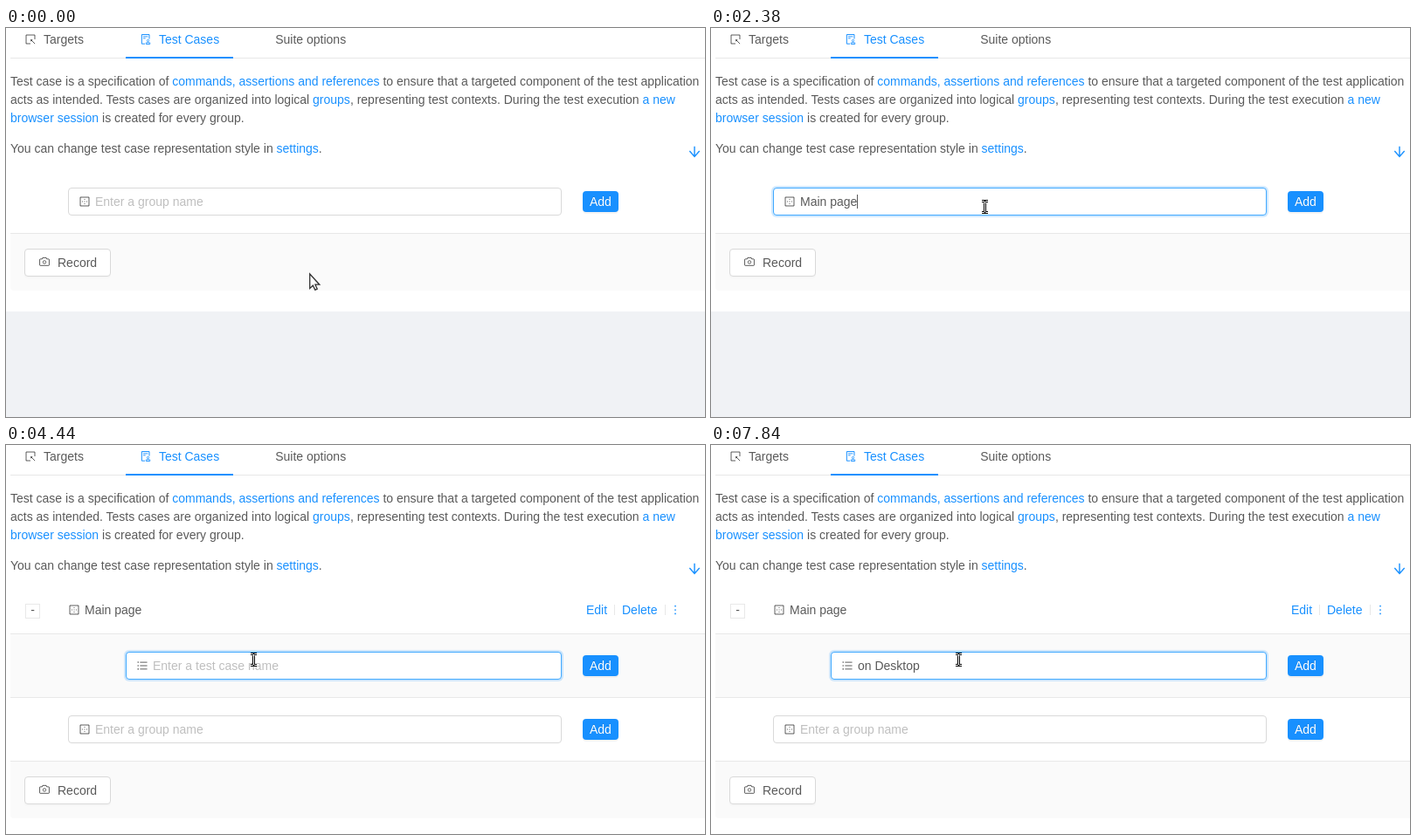
Write an HTML page that moves like this. It is 800 px wide and 446 px high and loops after 8000 ms.

```html
<!DOCTYPE html>
<html lang="en">
<head>
<meta charset="utf-8">
<title>Test cases</title>
<style>
html, body { margin: 0; width: 100%; height: 100%; overflow: hidden; background: #fff; }
body { position: relative; font: 14px/16px "Liberation Sans", Arial, sans-serif; color: rgba(0,0,0,.65); }
body *:not(a) { box-sizing: border-box; }
div, span, svg.i, svg.cursor { position: absolute; white-space: nowrap; }
a { color: #1890ff; }
.i { width: 14px; height: 14px; fill: none; stroke: currentColor; stroke-width: 72; }
.blue { color: #1890ff; }
.line { left: 5px; right: 0; height: 1px; background: #e8e8e8; }
.panel { left: 5px; right: 0; background: #fafafa; }
.input { height: 32px; border: 1px solid #d9d9d9; border-radius: 4px; background: #fff; }
.input.hover { border-color: #8cc1ec; }
.input.active, .input.focus { border-color: #40a9ff; }
.input.focus { box-shadow: 0 0 0 2px rgba(24,144,255,.2); }
.hint { color: #bfbfbf; }
.caret { width: 1px; height: 16px; background: #595959; }
.add { left: 660px; width: 41px; height: 24px; padding: 4px 0 0 8px; border-radius: 4px; color: #fff;
  background: #1890ff; text-shadow: 0 -1px 0 rgba(0,0,0,.12); box-shadow: 0 2px 0 rgba(0,0,0,.045); }
.record { left: 21px; top: 253px; width: 99px; height: 32px; border: 1px solid #d9d9d9; border-radius: 4px;
  background: #fff; box-shadow: 0 2px 0 rgba(0,0,0,.015); }
.toggle { left: 22px; top: 182px; width: 17px; height: 17px; border: 1px solid #e8e8e8; background: #fff; }
.sep { top: 183px; width: 1px; height: 12px; background: #e8e8e8; }
.cursor { width: 24px; height: 24px; overflow: visible; }
#lower { left: 0; width: 100%; height: 446px; }
#group { left: 0; top: 0; width: 100%; height: 446px; }
</style>
</head>
<body>
<svg width="0" height="0" style="position:absolute">
  <symbol id="select" viewBox="0 0 1024 1024">
    <path d="M512 876H148V148H876V512M590 590L882 882"/>
    <path d="M512 512L710 534 534 710z" fill="currentColor" stroke="none"/>
  </symbol>
  <symbol id="audit" viewBox="0 0 1024 1024">
    <path d="M440 888H172V112H804V476"/>
    <path d="M288 282H688M288 426H488M696 720V780M535 795H857V917H535z" stroke-width="63"/>
    <circle cx="696" cy="620" r="81" stroke-width="62"/>
  </symbol>
  <symbol id="grid" viewBox="0 0 1024 1024">
    <path d="M148 148H876V876H148z"/>
    <path d="M476 330h72M294 512h72M476 512h72M658 512h72M476 694h72"/>
  </symbol>
  <symbol id="list" viewBox="0 0 1024 1024">
    <path d="M320 228H920M320 512H920M320 796H920"/>
    <path d="M160 228h0M160 512h0M160 796h0" stroke-width="112" stroke-linecap="round"/>
  </symbol>
  <symbol id="camera" viewBox="0 0 1024 1024">
    <path d="M160 284H321L361 172H663L703 284H864a44 44 0 0 1 44 44V784a44 44 0 0 1-44 44H160a44 44 0 0 1-44-44V328a44 44 0 0 1 44-44z"/>
    <circle cx="512" cy="544" r="128" stroke-width="64"/>
  </symbol>
  <symbol id="down" viewBox="0 0 1024 1024">
    <path d="M512 152V820M190 452L512 826 834 452" stroke-width="80"/>
  </symbol>
  <symbol id="more" viewBox="0 0 1024 1024">
    <path d="M512 232h0M512 512h0M512 792h0" stroke-width="112" stroke-linecap="round"/>
  </symbol>
</svg>

<svg class="i" style="left:21px;top:6px"><use href="#select"/></svg>
<span style="left:43px;top:5px">Targets</span>
<svg class="i blue" style="left:153px;top:6px"><use href="#audit"/></svg>
<span class="blue" style="left:174.9px;top:5px">Test Cases</span>
<span style="left:308.2px;top:5px">Suite options</span>
<div class="line" style="top:34px"></div>
<div style="left:137px;top:33px;width:123px;height:2px;background:#1890ff"></div>

<span style="left:5px;top:53px">Test case is a specification of <a>commands, assertions and references</a> to ensure that a targeted component of the test application</span>
<span style="left:5px;top:74px">acts as intended. Tests cases are organized into logical <a>groups</a>, representing test contexts. During the test execution <a>a new</a></span>
<span style="left:5px;top:95px"><a>browser session</a> is created for every group.</span>
<span style="left:5px;top:130px">You can change test case representation style in <a>settings</a>.</span>
<svg class="i blue" style="left:779px;top:133px;width:18px;height:18px"><use href="#down"/></svg>

<div id="group">
  <div class="toggle"></div>
  <span style="left:28.2px;top:181px">-</span>
  <svg class="i" style="left:71px;top:182px"><use href="#grid"/></svg>
  <span style="left:90px;top:181px">Main page</span>
  <span class="blue" style="left:664px;top:181px">Edit</span>
  <div class="sep" style="left:696px"></div>
  <span class="blue" style="left:705px;top:181px">Delete</span>
  <div class="sep" style="left:754px"></div>
  <svg class="i blue" style="left:758px;top:181px;width:16px;height:16px"><use href="#more"/></svg>
  <div class="line" style="top:216px"></div>
  <div class="panel" style="top:217px;height:72px"></div>
  <div class="line" style="top:289px"></div>
  <div class="input" id="caseBox" style="left:137px;top:237px;width:499px"></div>
  <svg class="i" style="left:149px;top:246px"><use href="#list"/></svg>
  <span id="caseText" style="left:168px;top:245px"></span>
  <div class="add" style="top:241px">Add</div>
</div>

<div id="lower">
  <div class="input" id="groupBox" style="left:71px;top:183px;width:565px"></div>
  <svg class="i" style="left:83px;top:192px"><use href="#grid"/></svg>
  <span id="groupText" style="left:102px;top:191px"></span>
  <div class="add" style="top:187px">Add</div>
  <div class="line" style="top:235px"></div>
  <div class="panel" style="top:236px;height:65px;border-bottom-left-radius:4px"></div>
  <div class="record"></div>
  <svg class="i" style="left:37px;top:261px"><use href="#camera"/></svg>
  <span style="left:59px;top:261px">Record</span>
  <div style="left:0;right:0;top:325px;height:121px;background:#f0f2f5"></div>
</div>

<div class="caret" id="caret"></div>

<svg class="cursor" id="arrow" style="left:347px;top:281px">
  <path d="M.7 1V17.6L4.3 14.2 6.8 19.3 9.2 18.1 6.9 13.2H11.8z" fill="#fff" stroke="#333" stroke-width="1.3"/>
</svg>
<svg class="cursor" id="beam" fill="none">
  <path id="stem" d="M1 1.5H3.5L4.5 2.5 5.5 1.5H8M4.5 2V14M1 14.5H3.5L4.5 13.5 5.5 14.5H8" stroke="#000" stroke-width="3"/>
  <path d="M1 1.5H3.5L4.5 2.5 5.5 1.5H8M4.5 2V14M1 14.5H3.5L4.5 13.5 5.5 14.5H8" stroke="#fff"/>
</svg>
<svg class="cursor" id="hand" style="left:303px;top:199px">
  <path d="M3 13H15a1.7 1.7 0 0 0 1.4-1.7V6a1.6 1.6 0 0 0-3-1.2V3.2a1.7 1.7 0 0 0-3-.8 1.6 1.6 0 0 0-3.2-.2 1.7 1.7 0 0 0-2.6 1.5V5C2 3.4.3 5 .8 7.5V10z" fill="#fff" stroke="#1f8428" stroke-width="1.4"/>
  <path d="M2.5 13.4H15" stroke="#35543a"/>
  <path d="M5 8.5h1.4M8 8.5h1.4M11 8.5h1.4" stroke="#667"/>
</svg>

<script>
const LOOP = 8000, SWITCH = 3080;
const $ = id => document.getElementById(id);

// [start ms, typed text, caret visible]
const groupSteps = [
  [0, "", false], [330, "", true], [660, "", false], [1010, "Ma", true], [1380, "Main ", true],
  [1700, "Main p", true], [2050, "Main pag", true], [2380, "Main page", true], [SWITCH, "", false]
];
const caseSteps = [
  [0, "", false], [4770, "on ", true], [5450, "on ", false], [5800, "on D", true], [6130, "on Des", true],
  [6480, "on Desk", true], [6810, "on Deskt", true], [7160, "on Desktop", true], [7840, "on Desktop", false]
];

const stepAt = (steps, t) => steps.filter(s => s[0] <= t).pop();
const show = (id, on) => $(id).style.visibility = on ? "visible" : "hidden";
const place = (id, x, y) => Object.assign($(id).style, { left: x + "px", top: y + "px" });

function setField(id, [, text], hint) {
  const el = $(id);
  el.textContent = text || hint;
  el.style.whiteSpace = "pre";
  el.className = text ? "" : "hint";
}

function render(t) {
  const grouped = t >= SWITCH;
  const groupStep = stepAt(groupSteps, t), caseStep = stepAt(caseSteps, t);
  setField("groupText", groupStep, "Enter a group name");
  setField("caseText", caseStep, "Enter a test case name");
  show("group", grouped);
  $("lower").style.top = (grouped ? 127 : 0) + "px";
  $("groupBox").className = "input" + (t >= 330 && !grouped ? " focus" : "");
  $("caseBox").className = "input" + (t >= 4440 ? " focus" : t >= 4090 ? " active" : t >= 3760 ? " hover" : "");

  const [, text, caretOn] = grouped ? caseStep : groupStep;
  const box = $(grouped ? "caseText" : "groupText").getBoundingClientRect();
  place("caret", Math.round(box.left + (text ? box.width : 0)), box.top);
  show("caret", caretOn);

  show("arrow", t < 330);
  show("hand", grouped && t < 3760);
  show("beam", t >= 330 && (!grouped || t >= 3760));
  if (grouped) place("beam", 279, 238);
  else place("beam", 309, 197);
}

function tick() {
  render(performance.now() % LOOP);
  requestAnimationFrame(tick);
}
tick();
</script>
</body>
</html>
```
